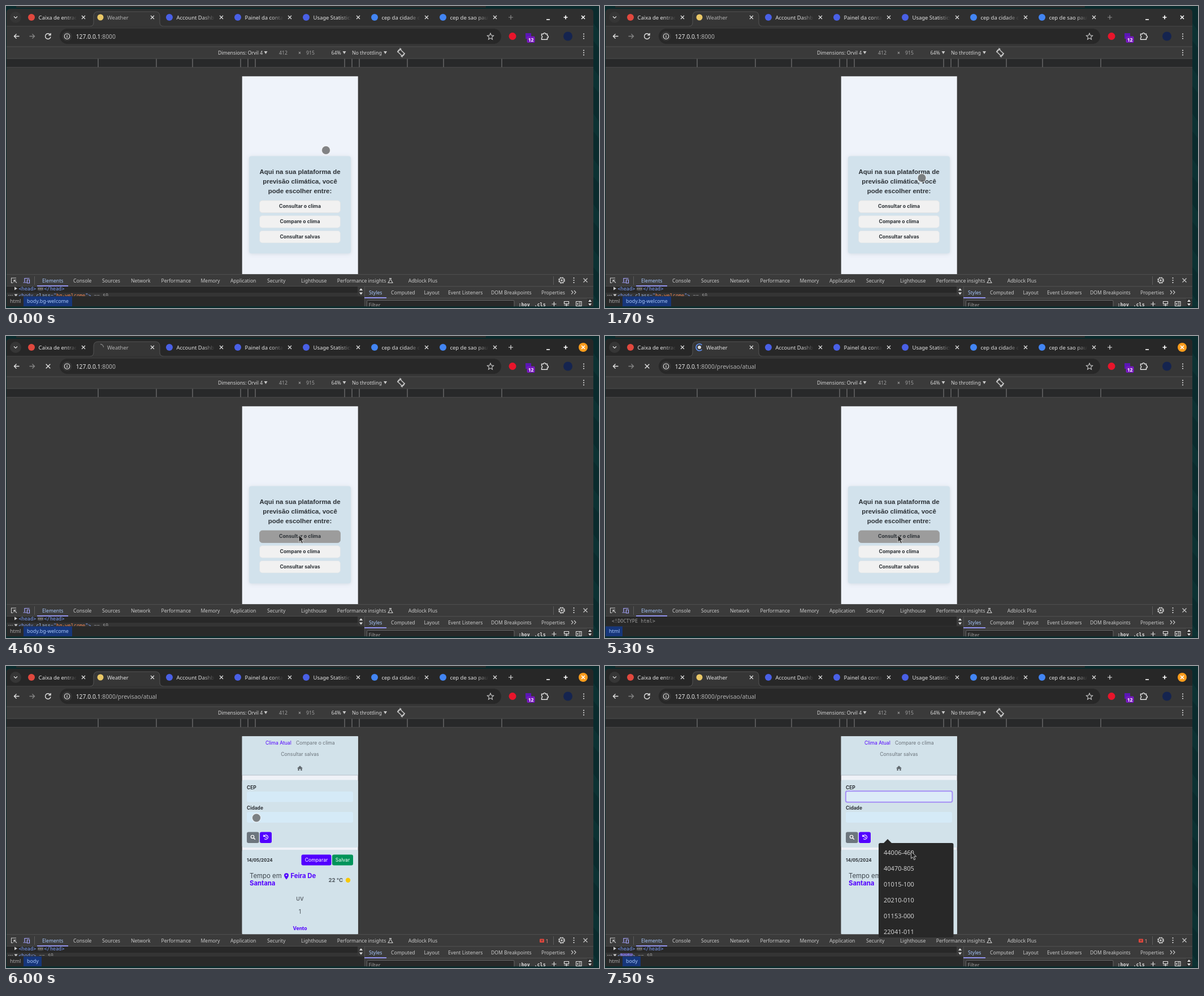
Recreate the animation shown at these times as an HTML page. Size 1049 by 534 pixels, loop 8000 ms.

```html
<!DOCTYPE html>
<html lang="pt">
<head>
<meta charset="utf-8">
<title>Weather</title>
<style>
html, body { margin: 0; width: 100%; height: 100%; overflow: hidden; background: #0b2a2c; }
svg { display: block; width: 100%; height: 100%; font-family: "Noto Sans", sans-serif; }
.page { font-family: Inter, sans-serif; }
.head { font-family: "Liberation Sans", Arial, sans-serif; }
.mono { font-family: "DejaVu Sans Mono", monospace; }
.mid { text-anchor: middle; }
.bold { font-weight: 700; }
</style>
</head>
<body>
<svg id="stage" viewBox="0 0 1049 534" preserveAspectRatio="none"></svg>
<script>
const LOOP = 8000;
const FOCUS = 3600, COMMIT = 4800, PAGE = 5500, LOADED = 5700, READY = 6000, LIST = 6800, RING = 7000;
const PURPLE = '#5200ff', INK = '#2c3136', PALE = '#d2e2ea', UI = '#c9c9c9', BAR = '#363636';

// Drawing helpers: each returns SVG markup
const box = (x, y, w, h, fill, r = 0, more = '') =>
  `<rect x="${x}" y="${y}" width="${w}" height="${h}" rx="${r}" fill="${fill}" ${more}/>`;
const disc = (x, y, r, fill, more = '') => `<circle cx="${x}" cy="${y}" r="${r}" fill="${fill}" ${more}/>`;
const text = (s, x, y, size, fill, cls = '') =>
  `<text x="${x}" y="${y}" font-size="${size}" fill="${fill}" class="${cls}">${s}</text>`;
const line = (d, color = UI, w = 1.2) => `<path d="${d}" fill="none" stroke="${color}" stroke-width="${w}"/>`;
const shape = (d, fill, more = '') => `<path d="${d}" fill="${fill}" ${more}/>`;
const cross = (x, y, r, color = '#e3e3e3', w = 1.2) =>
  line(`M${x - r} ${y - r}l${2 * r} ${2 * r}m0 ${-2 * r}l${-2 * r} ${2 * r}`, color, w);
const plus = (x, y, r, color, w = 1.2) => line(`M${x - r} ${y}h${2 * r}M${x} ${y - r}v${2 * r}`, color, w);
const down = (x, y) => shape(`M${x - 3} ${y - 2.5}h6l-3 5z`, UI);
const dots = (x, y) => [-4, 0, 4].map(d => disc(x, y + d, 1.1, '#dedede')).join('');
const during = (from, to, s) => `<g data-from="${from}" data-to="${to}">${s}</g>`;
const tags = s => s.replace(/</g, '&lt;').replace(/>/g, '&gt;');
const span = (s, fill) => `<tspan fill="${fill}">${tags(s)}</tspan>`;

function desktop() {
  let s = box(0, 0, 1049, 534, '#0a2b2d') + box(18, 0, 831, 3, '#292b2b', 1);
  for (let y = 30; y < 534; y += 80) s += shape(`M1039 ${y}l10 14v30l-10-12z`, '#0c3233');
  return s;
}

function tabStrip() {
  const tabs = [
    [45, 'Caixa de entrada', '#e0483e'], [289, 'Account Dashboard', '#4960e6'],
    [410, 'Painel da conta', '#4960e6'], [531, 'Usage Statistics', '#4960e6'],
    [652, 'cep da cidade de', '#4285f4'], [773, 'cep de sao paulo', '#4285f4']];
  const frame = 'M1 74V12q0-7 7-7H1032q7 0 7 7V74z';
  let s = shape(frame, '#2f2f2f') + during(FOCUS, LOOP, shape(frame, '#272727'));
  s += disc(17, 20, 10, BAR) + line('M14 18.5l3 3l3-3', '#e3e3e3');
  for (const [x, name, color] of tabs)
    s += disc(x, 20, 6, color) + cross(x + 92, 20, 3) +
      `<g transform="translate(${x + 12.5} 23.5)">${text(name, 0, 0, 9.45, 'url(#fade)')}</g>`;
  s += shape('M148 36q7 0 7-7V18q0-8 8-8H264q8 0 8 8V29q0 7 7 7z', BAR) +
    line('M1 36H148q7 0 7-7V18q0-8 8-8H264q8 0 8 8V29q0 7 7 7H1039', '#595959', 0.9) + cross(259, 20, 3);
  s += during(0, COMMIT, text('Weather', 179, 23.5, 9.45, '#b4b4b4')) +
    during(COMMIT, LOOP, text('Weather', 179, 23.5, 9.45, '#e6e6e6'));
  const icon = disc(167, 20, 5.5, '#e9c766');
  s += during(0, FOCUS, icon) + during(LOADED, LOOP, icon);
  s += `<g id="spin">` +
    during(FOCUS, COMMIT, line('M0 -5.5A5.5 5.5 0 0 1 5.5 0', '#858585', 1.3)) +
    during(COMMIT, LOADED, disc(0, 0, 3, '#d5d9df') +
      line('M-4.5 -4A6 6 0 1 1 -4.5 4', '#5f8ff0', 1.7)) + '</g>';
  s += during(0, FOCUS, plus(893, 20, 4, '#8b8b8b') + cross(1021, 20, 3, '#fff', 1.6)) +
    during(FOCUS, LOOP, plus(893, 20, 4, '#e3e3e3') +
      disc(1021, 20, 8, '#fa9c1c') + cross(1021, 20, 3, '#fff', 1.6));
  return s + line('M956 24h6', '#fff', 1.6) + plus(990, 20, 3.5, '#fff', 1.7);
}

function toolbar() {
  const reload = line('M78 50.5A4.8 4.8 0 1 0 79 54.5M79 48v3.5h-3.8', '#e3e3e3', 1.4);
  const address = s => text(`127.0.0.1<tspan fill="#b0b0b0">${s}</tspan>`, 123.7, 57.5, 10.35, '#e8e8e8');
  return box(1, 36.4, 1038, 35.6, BAR) + box(95, 40, 781, 27, '#282828', 13.5) +
    line('M23.5 53.5h-9m4-4l-4 4l4 4', '#e3e3e3', 1.4) + line('M41.5 53.5h9m-4-4l4 4l-4 4', '#858585', 1.4) +
    during(0, FOCUS, reload) + during(FOCUS, LOADED, cross(74.5, 53.5, 3.8, '#e3e3e3', 1.4)) +
    during(LOADED, LOOP, reload) +
    disc(108, 53.5, 8.5, BAR) + disc(108, 53.5, 4.7, 'none', 'stroke="#ddd" stroke-width="1.1"') +
    line('M108 52.8v3.2M108 50.7v1.2', '#ddd', 1.2) +
    during(0, COMMIT, address(':8000')) + during(COMMIT, LOOP, address(':8000/previsao/atual')) +
    line('M857 48.2l1.6 3.7l4 .4l-3 2.7l.9 4l-3.5-2.1l-3.5 2.1l.9-4l-3-2.7l4-.4z', UI, 1.1) +
    disc(896, 53.5, 6.5, '#e8152b') +
    box(919, 48, 10, 10, '#5a17b5') + box(921.5, 53.5, 14, 11.5, '#7619bd', 2) +
    text('12', 928.5, 62.5, 8.5, '#fff', 'mid bold') +
    line('M947.5 49.5h3.2a1.9 1.9 0 0 1 3.8 0h3v3a1.9 1.9 0 0 1 0 3.8v3h-10v-3.2a1.8 1.8 0 0 0 0-3.4z', '#e3e3e3', 1.4) +
    disc(994, 53.5, 8, '#15244f') + dots(1022, 53.5);
}

function deviceBar() {
  const ticks = [163, 266, 330, 415, 428, 441, 599, 612, 625, 710, 774, 877];
  const label = (s, x, color = '#d5d5d5') => text(s, x, 86.2, 8.7, color);
  return box(1, 72, 1038, 403, '#3a3a3a') + box(1, 71.5, 1038, 0.8, '#555') +
    label('Dimensions: Orvil 4', 375) + down(459.5, 82.5) + label('412', 483, '#a0a0a0') +
    label('×', 517, '#c0c0c0') + label('915', 531, '#a0a0a0') + label('64%', 575.5) + down(598.5, 82.5) +
    label('No throttling', 612) + down(671, 82.5) +
    `<g transform="rotate(-45 699 82.5)">${box(696, 77.3, 6, 10.4, 'none', 1, `stroke="${UI}" stroke-width="1.4"`)}</g>` +
    line('M692.7 82A6.5 6.5 0 0 1 698.5 76l-2-1.5M705.3 83A6.5 6.5 0 0 1 699.5 89l2 1.5', UI, 1.4) + dots(1022, 82.5) +
    box(1, 93, 1038, 15.5, '#28292a') + line('M1 93h1038M1 108.3h1038', '#555', 0.8) +
    ticks.map(x => line(`M${x} 93.5v14.5`, '#858585', 1)).join('');
}

function welcome() {
  const lines = ['Aqui na sua plataforma de', 'previsão climática, você', 'pode escolher entre:'];
  const buttons = ['Consultar o clima', 'Compare o clima', 'Consultar salvas'];
  return box(417.7, 124.3, 205, 350, '#eff3fa') +
    box(430, 265.5, 180, 172, '#d2e2ec', 4, 'filter="url(#soft)"') +
    lines.map((s, i) => text(s, 520, 296.6 + i * 17.1, 11.44, INK, 'head bold mid')).join('') +
    buttons.map((s, i) => box(448.5, 344 + i * 26.7, 143, 21.5, '#f1f1f1', 5,
      i ? 'stroke="#dde4e8" stroke-width=".8"' : 'id="press" stroke-width=".8"') +
      text(s, 520, 357.2 + i * 26.8, 8.7, INK, 'page bold mid')).join('');
}

function forecast() {
  const t = (s, x, y, size, fill, cls = '') => text(s, x, y, size, fill, 'page ' + cls);
  return box(417.7, 124.3, 205, 350, '#eff2f8') +
    box(417.7, 124.3, 205, 68.5, PALE) + box(417.7, 192.5, 205, 1, '#b4c0ca') +
    t('Clima Atual', 459, 139.2, 8.6, PURPLE) + t('Compare o clima', 513, 139.2, 8.6, '#6a7279') +
    t('Consultar salvas', 520, 159.3, 8.6, '#6a7279', 'mid') +
    shape('M515 181l5-4.8l5 4.8h-1.4v4h-2.4v-3h-2.4v3h-2.4v-4z', '#646c72') +
    box(417.7, 201.5, 205, 119.5, PALE, 3) +
    t('CEP', 426, 217.8, 8.4, INK, 'bold') + box(426, 222, 188, 18.5, '#d5eaf7', 3) +
    t('Cidade', 426, 253.8, 8.4, INK, 'bold') + box(426, 258, 188, 19, '#d5eaf7', 3) +
    box(426, 293.5, 21.5, 19.5, '#6c757d', 3) +
    disc(436, 302, 2.7, 'none', 'stroke="#fff" stroke-width="1.3"') + line('M438 304l2.8 2.8', '#fff', 1.5) +
    box(449, 293.5, 21, 19.5, PURPLE, 3) +
    line('M456.3 301a3.8 3.8 0 1 1 .8 4.4M455.8 298.5v2.9h2.9M460 301v2.4l1.6 1', '#fff', 1.1) +
    box(417.7, 325, 205, 150, PALE, 3) +
    t('14/05/2024', 426, 345.5, 7.9, INK, 'bold') +
    box(522.5, 333.5, 53, 19, PURPLE, 3) + t('Comparar', 549, 345.8, 8.6, '#fff', 'mid') +
    box(577, 333.5, 37, 19, '#00945a', 3) + t('Salvar', 595.5, 345.8, 8.6, '#fff', 'mid') +
    t('Tempo em', 431, 375, 11.4, '#3c444b') +
    shape('M496 377.5q-4-4.7-4-7.3a4 4 0 0 1 8 0q0 2.6-4 7.3zM496 368.7a1.4 1.4 0 1 0 .01 0z', PURPLE, 'fill-rule="evenodd"') +
    t('Feira De', 503.5, 375, 11.3, PURPLE, 'bold') + t('Santana', 431, 387.6, 11.3, PURPLE, 'bold') +
    t('22 °C', 570.5, 382.3, 9.6, '#50585f', 'bold') + disc(605, 378.7, 4.2, '#f8c800') +
    t('UV', 520, 414.5, 9, '#6a7279', 'mid bold') + t('1', 520, 437.5, 10.5, '#50585f', 'mid') +
    t('Vento', 520, 467, 8.7, PURPLE, 'mid bold') +
    during(RING, LOOP, box(425.8, 221.3, 188.6, 19.4, '#dcebf8', 3, 'stroke="#a58ff5" stroke-width="2"'));
}

function elements() {
  const BLUE = '#7c9df5', GREY = '#9a9a9a';
  const row = (s, x, y) => text(s, x, y, 8.5, BLUE, 'mono');
  const head = shape('M15 496.5l5 3l-5 3z', UI) + row(tags('<head>'), 22.5, 502.8) +
    box(55.5, 496.5, 11, 7, '#4a4a4a', 3) + [58, 61, 64].map(x => disc(x, 500, 0.8, '#ddd')).join('') +
    row(tags('</head>'), 67.5, 502.8) + box(1, 507, 621, 7, '#343434') +
    [5, 8, 11].map(x => disc(x, 511.5, 0.7, UI)).join('') + shape('M14.5 509.5h6l-3 4.5z', UI);
  const dollar = span(' == $0', GREY);
  const crumb = (s, x, w) => box(x - 6, 513.5, w, 17.5, '#16367a') + text(s, x, 525.3, 8.9, '#a8c7fa');
  const bar = box(1, 513, 633, 18, '#292929') + line('M1 513.2h633', '#3a3a3a', 0.7);
  const html = text('html', 7, 525.3, 8.9, '#b0b0b0');
  return box(1, 496, 633, 35, '#282828') +
    during(0, COMMIT, head + row(span('<body ', BLUE) + span('class', '#a8c7fa') + span('="', BLUE) +
      span('bg-welcome', '#fe8d59') + span('">', BLUE) + dollar, 22.5, 515) + bar + html + crumb('body.bg-welcome', 37, 86)) +
    during(COMMIT, 5000, bar) +
    during(5000, READY, row(span('<!DOCTYPE html>', GREY), 12, 507) + bar + crumb('html', 7, 30)) +
    during(READY, LOOP, head + during(RING, LOOP, box(27, 508, 22, 6, '#66539e')) +
      row(span('<body>', BLUE) + dollar, 22.5, 515) + bar + html + crumb('body', 37, 32)) +
    box(622, 496, 12, 17, '#3a3a3a') + shape('M625 503l3-4l3 4zM625 506.5h6l-3 4z', '#e0e0e0');
}

function devtools() {
  const list = (items, y) => items.map(([s, x], i) => text(s, x, y, 8.65, i ? UI : '#a8c7fa')).join('');
  return box(1, 474.5, 1038, 57, '#3b3b3b') + line('M1 474.7h1038M1 495.8h1038', '#585858', 0.8) +
    line('M18 481h-8.5v8.5h3M14 484.5l5 5M14 488.5v-4h4', UI, 1.1) +
    line('M33 488v-6.5h8.5M30.5 489h6M37.5 484h4v6h-4z', '#a8a6ff', 1.2) + line('M50.5 478v15M968.5 478v15', '#666', 0.8) +
    list([['Elements', 64], ['Console', 119], ['Sources', 170], ['Network', 221], ['Performance', 274.5],
      ['Memory', 344.5], ['Application', 397], ['Security', 462], ['Lighthouse', 522],
      ['Performance insights', 585.7], ['Adblock Plus', 711.7]], 488.8) +
    box(55, 494, 55, 1.8, '#9a9bff') + line('M678 481.5h4M679 481.5v3l-3 5h8l-3-5v-3', UI, 1.1) +
    during(READY, LOOP, box(944, 482.5, 8, 6.5, '#e0463c', 1) + cross(948, 485.5, 1.4, '#3b3b3b', 0.9) +
      text('1', 954.5, 489.5, 9, '#e58a84')) +
    disc(983, 485, 5, 'none', `stroke="${UI}" stroke-width="1.8" stroke-dasharray="2.6 1.33"`) +
    disc(983, 485, 4, 'none', `stroke="${UI}" stroke-width="1.2"`) + disc(983, 485, 1.7, UI) +
    dots(1004.5, 485) + cross(1025, 485, 3.5, UI) +
    elements() +
    line('M634.3 496v35M634 516.5h405', '#585858', 0.8) +
    list([['Styles', 642], ['Computed', 681], ['Layout', 739.5], ['Event Listeners', 782],
      ['DOM Breakpoints', 858], ['Properties', 947]], 509.8) +
    box(634, 515, 39, 1.8, '#9a9bff') + line('M1000 503l3 3.3l-3 3.3M1005 503l3 3.3l-3 3.3') +
    box(638.5, 520.5, 260.5, 14, '#282828', 2, 'stroke="#777" stroke-width=".8"') +
    text('Filter', 641.5, 531.5, 8.75, '#a0a0a0') + text(':hov', 906.5, 530.5, 8.4, '#e0e0e0', 'mono bold') +
    text('.cls', 934.5, 530.5, 8.4, '#e0e0e0', 'mono bold') + plus(969.5, 527, 4, '#e0e0e0') +
    line('M987.5 522.5h8v4h-8zM987.5 529h8M991.5 527v4', '#e0e0e0') +
    line('M1008.5 522.5h9.5v8h-9.5zM1015 522.5v8M1012.5 525l-2 1.8l2 1.8', '#e0e0e0', 1.1) +
    box(1028, 517, 11, 14, '#333') + shape('M1030 523l3-4l3 4zM1030 526h6l-3 4z', '#e0e0e0') +
    box(0, 531.3, 1049, 3, '#0a2b2d');
}

function suggestions() {
  const codes = ['44006-460', '40470-805', '01015-100', '20210-010', '01153-000', '22041-011'];
  return shape('M484 316q0-3 3-3h6l7-7l7 7h106.5q3 0 3 3V477q0 3-3 3H487q-3 0-3-3z', '#282828') +
    codes.map((s, i) => text(s, 493, 334.2 + i * 28, 11, '#d0d0d0')).join('');
}

const stage = document.getElementById('stage');
stage.innerHTML = `<defs>
  <linearGradient id="fade" gradientUnits="userSpaceOnUse" x1="46" x2="68">
    <stop stop-color="#e3e3e3"/><stop offset="1" stop-color="#e3e3e3" stop-opacity="0"/></linearGradient>
  <filter id="soft" x="-10%" y="-10%" width="120%" height="120%">
    <feDropShadow dx="0" dy="1" stdDeviation="3" flood-color="#7f929e" flood-opacity=".25"/></filter></defs>` +
  desktop() + tabStrip() + toolbar() + deviceBar() +
  during(0, PAGE, welcome()) + during(PAGE, LOOP, forecast()) +
  devtools() + during(LIST, LOOP, suggestions()) +
  `<g id="pointer"><g id="touch">${disc(0, 0, 7.6, 'rgba(92,92,92,.75)', 'stroke="rgba(255,255,255,.7)" stroke-width="1.2"')}</g>
  <g id="arrow">${shape('M0 0v12.5l3-2.7l2.2 5l2.2-1l-2.2-4.9h4z', '#222', 'stroke="#eee" stroke-width=".8"')}</g></g>`;

// Pointer path as [time, x, y], sampled ten times a second
const path = [[0, 566, 255], [500, 566, 255], [800, 604, 248], [1100, 586, 278], [1400, 565, 307], [1500, 563, 310],
  [1700, 560.5, 304], [2000, 208, 107], [2300, 482, 156], [2500, 501, 265], [2900, 501, 265], [3000, 521, 338],
  [3100, 518, 352], [5900, 518, 352], [6000, 443, 268.5], [6100, 443, 257], [6200, 443, 257], [6400, 479, 236],
  [6500, 448, 234], [6700, 448, 234], [6800, 440, 234], [7200, 440, 234], [7300, 515, 281], [7400, 515, 281],
  [7500, 541.5, 328], [LOOP, 541.5, 328]];
const spins = [3600, 3800, 3900, 4000, 4100, 4300, 4400, 4500, 4600, 4800, 5000, 5300, 5500];

function pointerAt(t) {
  const i = path.findIndex(p => p[0] > t);
  const [a, b] = [path[i - 1], path[i]];
  const k = (t - a[0]) / (b[0] - a[0]);
  return [a[1] + (b[1] - a[1]) * k, a[2] + (b[2] - a[2]) * k];
}

const $ = id => document.getElementById(id);
const timed = [...stage.querySelectorAll('[data-from]')];
const show = (el, on) => el.setAttribute('display', on ? 'inline' : 'none');
const start = performance.now();

function frame() {
  const t = Math.floor((performance.now() - start) % LOOP / 100) * 100;
  for (const el of timed) show(el, t >= +el.dataset.from && t < +el.dataset.to);

  const [x, y] = pointerAt(t);
  const onPage = x > 418 && x < 622 && y > 124 && y < 474;
  const arrow = !onPage || (t >= FOCUS && t < PAGE) || t >= 7500;
  $('pointer').setAttribute('transform', `translate(${x} ${y})`);
  show($('arrow'), arrow);
  show($('touch'), !arrow);

  const pressed = Math.min(1, Math.max(0, (t - 3700) / 400));
  const grey = from => `rgb(${Array(3).fill(Math.round(from + (156 - from) * pressed))})`;
  $('press').setAttribute('fill', grey(241));
  $('press').setAttribute('stroke', grey(226));
  const turns = spins.filter(s => s <= t).length - 9;
  $('spin').setAttribute('transform', `translate(167 20) rotate(${turns * 60})`);
  requestAnimationFrame(frame);
}
frame();
</script>
</body>
</html>
```
